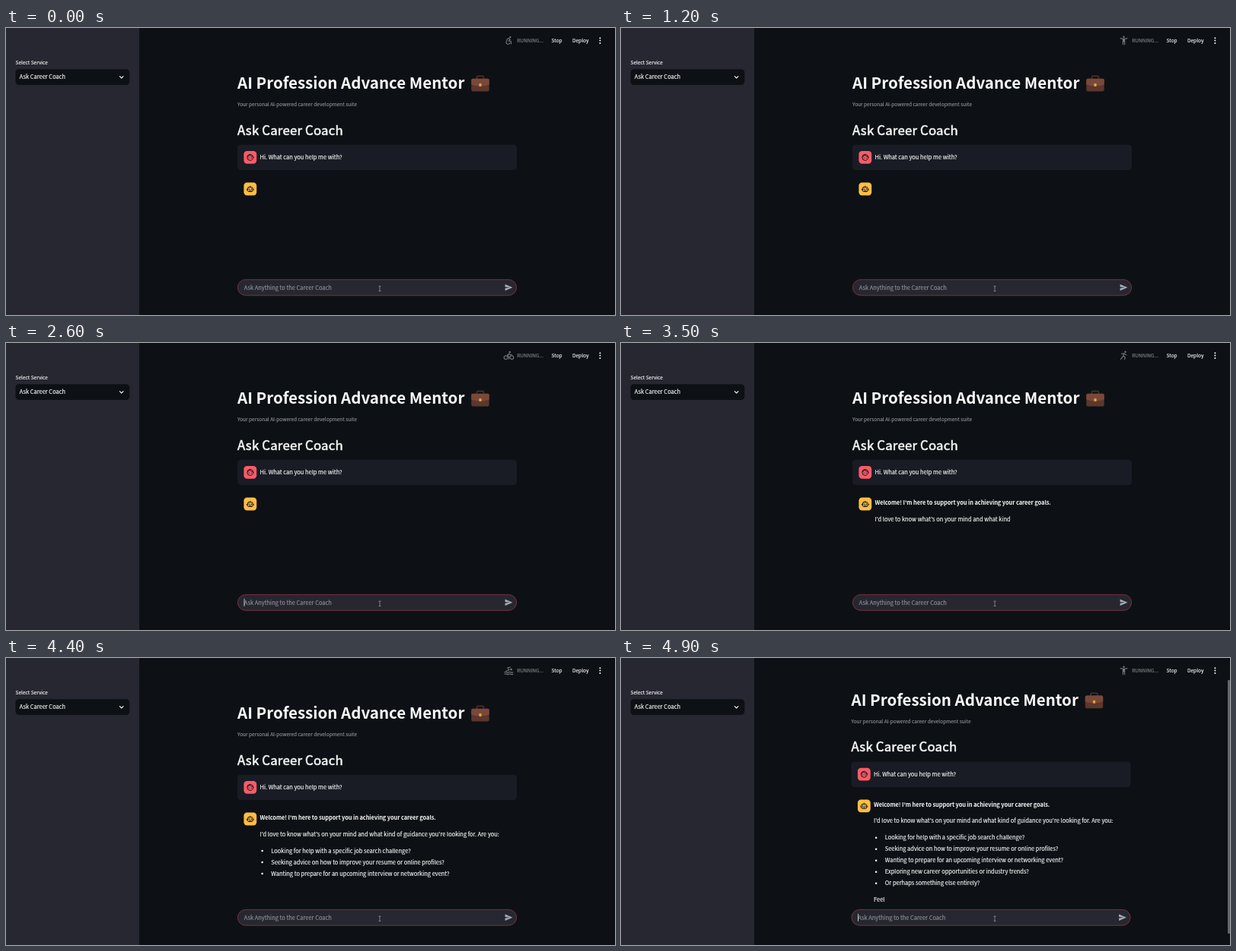
An HTML page for the animation above (5000 ms loop, 800 by 378 pixels).

```html
<!DOCTYPE html>
<html lang="en">
<head>
<meta charset="utf-8">
<title>Coaching chat</title>
<style>
  html, body { margin: 0; width: 100%; height: 100%; overflow: hidden; background: #0d1115; }
  svg { display: block; width: 100%; height: 100%; }
  text {
    font-family: "Noto Sans CJK JP", "Noto Sans CJK SC", "Noto Sans CJK", "Open Sans", sans-serif;
    font-size: 7.46px;
    fill: #fafafa;
    stroke: #fafafa;
    stroke-width: .14px;
  }
  .small { font-size: 6.53px; }
  .bold { font-weight: 600; letter-spacing: -.085px; stroke: none; }
  .title { font-size: 20.5px; font-weight: 700; stroke: none; }
  .heading { font-size: 16.8px; letter-spacing: .2px; stroke-width: .5px; }
  .muted { fill: #8f9196; stroke: #8f9196; }
  .dim { fill: #808389; stroke: #808389; }
  .line { fill: none; stroke-linecap: round; stroke-linejoin: round; }
  .ink { stroke: #15161b; stroke-width: 1; }
  .ink-fill { fill: #15161b; }
  .sport { stroke: #777a80; stroke-width: 1.1; }
  .sport circle.head { fill: #777a80; stroke: none; }
</style>
</head>
<body>
<svg viewBox="0 0 800 378" preserveAspectRatio="none">
  <rect width="800" height="378" fill="#0d1115"/>

  <g id="main">
    <g id="scroll">
      <text class="title" x="304" y="80.3">AI Profession Advance Mentor</text>
      <g id="briefcase">
        <path class="line" d="M618.5 67.5V65q0-1.6 1.6-1.6h5.8q1.6 0 1.6 1.6v2.5" stroke="#4b3029" stroke-width="1.6"/>
        <rect x="611.3" y="66.8" width="23.4" height="16.6" rx="1.8" fill="#5b372d"/>
        <path d="M613.1 66.8h19.8q1.8 0 1.8 1.8v6q-5 2-11.7 2t-11.7-2v-6q0-1.8 1.8-1.8z" fill="#7b4838"/>
        <rect x="621.4" y="73" width="3.2" height="4" rx=".7" fill="#dfa245"/>
      </g>
      <text class="small muted" x="304" y="102.8">Your personal AI-powered career development suite</text>
      <text class="heading" x="304" y="140.6">Ask Career Coach</text>

      <rect x="304" y="153.7" width="367" height="33.4" rx="4.2" fill="#191c24"/>
      <rect x="312.4" y="162" width="16.8" height="16.8" rx="4.2" fill="#f95b68"/>
      <g transform="translate(320.8 170.4)">
        <circle class="line ink" r="4"/>
        <path class="line ink" d="M-3.7-.6Q-1.6-1.2-.8-3.4Q.8-.9 3.7-1.2"/>
        <circle class="ink-fill" cx="-1.5" cy=".8" r=".65"/>
        <circle class="ink-fill" cx="1.5" cy=".8" r=".65"/>
      </g>
      <text x="333.5" y="173.1">Hi. What can you help me with?</text>

      <rect x="312.4" y="203.6" width="16.8" height="16.8" rx="4.2" fill="#ffbd45"/>
      <g transform="translate(320.8 212)">
        <rect class="line ink" x="-3.2" y="-2.3" width="6.4" height="5.8" rx="1"/>
        <path class="line ink" d="M0-2.3V-3.8M-4.4.2V1.4M4.4.2V1.4M-1.4 2H1.4"/>
        <circle class="ink-fill" cx="-1.4" cy="-.1" r=".75"/>
        <circle class="ink-fill" cx="1.4" cy="-.1" r=".75"/>
      </g>
      <g id="reply"></g>
    </g>

    <rect x="304.4" y="331.4" width="366.2" height="20.8" rx="10.4" fill="#262730" stroke="#85333f" stroke-width=".9"/>
    <text class="muted" x="312.8" y="344.6">Ask Anything to the Career Coach</text>
    <path id="caret" d="M313 336.8v10" stroke="#e6e6e8" stroke-width=".8"/>
    <path d="M655.6 337.6L665.4 341.8L655.6 346V342.7L662 341.8L655.6 340.9z" fill="#a9adb8"/>
  </g>

  <rect id="bar" x="797" y="29" width="3" height="334" rx="1" fill="#62656c"/>

  <rect width="175" height="378" fill="#262730"/>
  <text class="small" x="12.6" y="48.3">Select Service</text>
  <rect x="12.5" y="54.2" width="149.8" height="20.8" rx="4.2" fill="#0d1115"/>
  <text x="17.8" y="67.4">Ask Career Coach</text>
  <path class="line" d="M149.4 63.7l2.3 2.3 2.3-2.3" stroke="#fafafa" stroke-width="1.1"/>

  <g id="sports" class="line sport" transform="translate(660.5 16.6)">
    <g>
      <circle class="head" cx="1.8" cy="-4.5" r="1.2"/>
      <path d="M-2.6-1.7L0-3L1.7-1.7L-.2.6H2.7L3.2 4.4"/>
      <path d="M-2-.3A2.6 2.6 0 1 0 1.5 3"/>
    </g>
    <g>
      <circle class="head" cx="3.1" cy="-1.5" r="1.3"/>
      <path d="M-3.6.6L.6-1L-1.7-3.6L2-4.6"/>
      <path d="M-5.4 2.2q1.35-1 2.7 0t2.7 0 2.7 0 2.7 0M-5.4 4.6q1.35-1 2.7 0t2.7 0 2.7 0 2.7 0"/>
    </g>
    <g>
      <circle class="head" cx="1.3" cy="-4.7" r="1.2"/>
      <circle cx="-3.9" cy="2.5" r="2.4"/>
      <circle cx="3.9" cy="2.5" r="2.4"/>
      <path d="M0 4.2V1.2L-1.9-.6L.5-2.6L2.2-.9H4.2"/>
    </g>
    <g>
      <circle class="head" cx="0" cy="-4.9" r="1.2"/>
      <path d="M-4.4-3L-1.2-2.4H1.2L4.4-3M-1.1-2.4V5.2M1.1-2.4V5.2M0-2V1.4"/>
    </g>
    <g>
      <circle class="head" cx="2" cy="-4.8" r="1.2"/>
      <path d="M-3-2.4L.5-2.7L-.8.6L-4 4.7M-.8.6L1.6 2L1.2 5.2M.5-2.7L3.4-.7"/>
    </g>
    <g>
      <circle class="head" cx="1.5" cy="-4.8" r="1.2"/>
      <path d="M-3-.8L-2.6-2.4L.2-3L1.6-1L3.6-.6M.2-3L-.8.4L1 2V5.2M-.8.4L-1.4 2.6L-4.2 2"/>
    </g>
  </g>
  <text class="small dim" x="671.2" y="18.9">RUNNING...</text>
  <text class="small" x="716.6" y="18.9">Stop</text>
  <text class="small" x="744" y="18.9">Deploy</text>
  <g fill="#fafafa">
    <circle cx="780.4" cy="13.3" r="1"/>
    <circle cx="780.4" cy="16.6" r="1"/>
    <circle cx="780.4" cy="19.9" r="1"/>
  </g>

  <path class="line" d="M490 340.2h2M491 340.2v6.2M490 346.4h2" stroke="#a2a3a9" stroke-width=".7"/>
</svg>

<script>
  const LOOP = 5000, STEP = 100;
  const SCROLL_AT = 4800;
  const byId = id => document.getElementById(id);

  // Baseline, kind and words of each line of the reply
  const reply = [
    [213.2, "bold", "Welcome! I'm here to support you in achieving your career goals."],
    [234.7, "", "I'd love to know what's on your mind and what kind of guidance you're looking for. Are you:"],
    [256.5, "item", "Looking for help with a specific job search challenge?"],
    [271.5, "item", "Seeking advice on how to improve your resume or online profiles?"],
    [286.5, "item", "Wanting to prepare for an upcoming interview or networking event?"],
    [301.5, "item", "Exploring new career opportunities or industry trends?"],
    [316.5, "item", "Or perhaps something else entirely?"],
    [338.2, "", "Feel"]
  ];

  // Time and number of words shown
  const pace = [[3000, 0], [3500, 22], [4400, 59], [4800, 71], [4900, 72]];

  // Start of each pictogram within its cycle
  const sportStarts = [0, 300, 650, 950, 1350, 1700];
  const SPORT_CYCLE = 1900;

  function add(tag, attrs) {
    const el = document.createElementNS("http://www.w3.org/2000/svg", tag);
    for (const key in attrs) el.setAttribute(key, attrs[key]);
    byId("reply").append(el);
    return el;
  }

  const lines = reply.map(([y, kind, text]) => {
    const item = kind === "item";
    return {
      words: text.split(" "),
      dot: item && add("circle", { cx: 336.6, cy: y - 2.5, r: 1.25, fill: "#fafafa" }),
      el: add("text", { x: item ? 348.3 : 333.5, y, class: kind })
    };
  });

  const sports = [...byId("sports").children];

  function show(el, on) {
    el.style.visibility = on ? "visible" : "hidden";
  }

  function wordsAt(t) {
    if (t <= pace[0][0]) return 0;
    const i = pace.findIndex(p => t <= p[0]);
    const [t0, n0] = pace[i - 1], [t1, n1] = pace[i];
    return Math.floor(n0 + (n1 - n0) * (t - t0) / (t1 - t0));
  }

  function draw(t) {
    let left = wordsAt(t);
    for (const { words, dot, el } of lines) {
      const n = Math.max(0, Math.min(left, words.length));
      el.textContent = words.slice(0, n).join(" ");
      if (dot) show(dot, n > 0);
      left -= words.length;
    }

    const scrolled = t >= SCROLL_AT;
    byId("main").setAttribute("transform", `translate(${scrolled ? -1.5 : 0} 0)`);
    byId("scroll").setAttribute("transform", `translate(0 ${scrolled ? -17.2 : 0})`);
    show(byId("bar"), scrolled);

    show(byId("caret"), t >= 600 && (t + 400) % 1000 < 500);

    const phase = t % SPORT_CYCLE;
    const current = sportStarts.filter(s => s <= phase).length - 1;
    sports.forEach((el, i) => show(el, i === current));
  }

  const start = performance.now();
  let shown = -1;

  function frame() {
    const elapsed = performance.now() - start + 30;
    const t = Math.floor(elapsed % LOOP / STEP) * STEP;
    if (t !== shown) draw(shown = t);
    requestAnimationFrame(frame);
  }
  frame();
</script>
</body>
</html>
```
